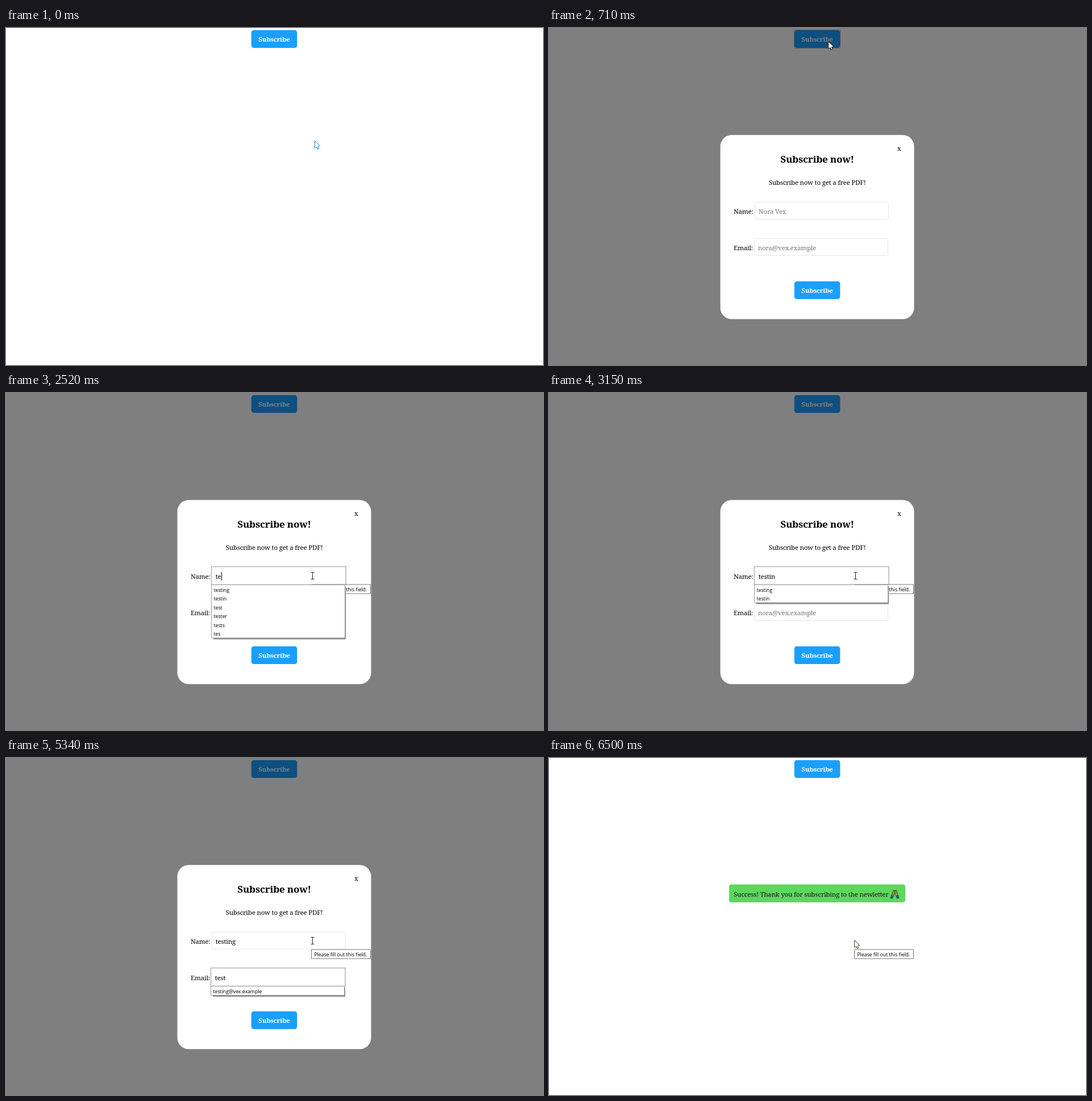
These frames come from a looping animation (945 by 593 pixels, 6.98 s). An HTML page with a canvas:

```html
<!DOCTYPE html>
<html lang="en">
<head>
<meta charset="utf-8">
<title>Subscribe form</title>
<style>
  html, body { margin: 0; width: 100%; height: 100%; overflow: hidden; background: #fff; }
  canvas { display: block; }
</style>
</head>
<body>
<canvas id="stage" width="945" height="593"></canvas>
<script>
const ctx = document.getElementById('stage').getContext('2d');
const LOOP = 6980;
const MID = 472;
const SERIF = '"Noto Serif", serif';
const BODY = `11.5px ${SERIF}`;
const BOLD = `bold 11.4px ${SERIF}`;
const TITLE = `bold 17px ${SERIF}`;
const SMALL = '8.8px "Open Sans", "Noto Sans", sans-serif';
const ROW = 15.5;
const HISTORY = ['testing', 'testin', 'test', 'tester', 'tests', 'tes'];
const EMAIL = 'testing@vex.example';

const during = (t, start, end) => t >= start && t < end;

// Letters appear one by one from start
const typed = (t, word, start, step) =>
  word.slice(0, Math.max(0, Math.floor((t - start) / step) + 1));

const nameAt = t => t < 4020 ? typed(t, 'testin', 2290, 138) : 'testing';
const emailAt = t => t < 5790 ? typed(t, 'test', 4630, 155) : EMAIL;
const caretAt = t => !(during(t, 2120, 2290) || during(t, 3150, 3700) || during(t, 5340, 5790));

function text(str, x, y, font = BODY, color = '#000', align = 'left') {
  ctx.font = font;
  ctx.letterSpacing = font === SMALL ? '-0.05px' : '-0.2px';
  ctx.textAlign = align;
  ctx.fillStyle = color;
  ctx.fillText(str, x, y);
}

function rect(x, y, w, h, color) {
  ctx.fillStyle = color;
  ctx.fillRect(x, y, w, h);
}

function box(x, y, w, h, radius, fill, stroke, line = 1) {
  ctx.beginPath();
  ctx.roundRect(x, y, w, h, radius);
  ctx.fillStyle = fill;
  ctx.fill();
  if (!stroke) return;
  ctx.strokeStyle = stroke;
  ctx.lineWidth = line;
  ctx.stroke();
}

function line(x1, y1, x2, y2, color, width = 1) {
  ctx.beginPath();
  ctx.moveTo(x1, y1);
  ctx.lineTo(x2, y2);
  ctx.strokeStyle = color;
  ctx.lineWidth = width;
  ctx.stroke();
}

function button(y, focused) {
  box(MID - 40.3, y - 0.3, 80.6, 31.4, 4.5, '#1a9fff');
  text('Subscribe', MID, y + 20, BOLD, '#fff', 'center');
  if (!focused) return;
  ctx.setLineDash([1, 1]);
  box(MID - 40.5, y - 0.5, 81, 32, 0, 'transparent', '#777');
  ctx.setLineDash([]);
}

function field(label, x, y, value, hint, focused, caret) {
  text(label, 325, y + 20.5);
  if (focused) box(x - 0.5, y - 0.5, 236.5, 32, 0, '#fff', '#b2b2b8', 1.5);
  else box(x + 0.5, y + 0.5, 235, 30, 3, '#fff', '#e4e6ea');
  text(value || hint, x + 6.7, y + 20.5, BODY, value ? '#000' : '#757575');
  if (!focused || !caret) return;
  const end = value ? ctx.measureText(value).width : 0;
  rect(Math.round(x + 7 + end), y + 9, 1, 15, '#000');
}

function dropdown(x, y, items, selected) {
  const h = items.length * ROW + 1;
  rect(x + 4, y + 3, 233, h - 0.5, '#8c8c8c');
  box(x + 0.5, y + 0.5, 235, h - 0.5, 0, '#fff', '#999');
  if (selected) rect(x + 1, y + 1, 234, ROW, '#0078d7');
  items.forEach((item, i) =>
    text(item, x + 4.5, y + 12.6 + i * ROW, SMALL, selected && !i ? '#fff' : '#000'));
}

function tooltip() {
  box(537.5, 337, 104, 16, 0, '#fff', '#767676');
  text('Please fill out this field.', 542.3, 349, SMALL);
}

function popup(t) {
  const name = nameAt(t);
  const email = emailAt(t);
  rect(0, 0, 945, 593, 'rgba(0,0,0,.5)');
  box(301.5, 188.3, 341, 324, 20, '#fff');
  text('x', 616.3, 216, BODY, '#000', 'center');
  text('Subscribe now!', MID, 237, TITLE, '#000', 'center');
  text('Subscribe now to get a free PDF!', MID, 275.5, BODY, '#000', 'center');
  field('Name:', 362, 306, name, 'Nora Vex', during(t, 1800, 4250), caretAt(t));
  field('Email:', 361, 370, email, 'nora@vex.example', during(t, 4250, 6180), caretAt(t));
  button(446, t >= 6180);
  if (t >= 2520) tooltip();
  if (during(t, 2367, 4020)) {
    dropdown(361, 337, HISTORY.filter(item => item.startsWith(name)), t >= 3700);
  }
  if (during(t, 4710, 5790)) dropdown(360, 401, [EMAIL], t >= 5570);
}

// Two mirrored palms with blue cuffs
function hands(x, y) {
  for (const side of [-1, 1]) {
    ctx.save();
    ctx.translate(x, y);
    ctx.scale(side, 1);
    line(3, 13, 7, 12, '#171717', 5);
    line(3, 13, 6.5, 12.2, '#1769c4', 3);
    line(0.8, 1, 4, 11, '#252515', 4);
    line(1, 2, 3.8, 10.5, '#b5a85a', 2.2);
    ctx.restore();
  }
}

function success() {
  box(317, 222.5, 310, 31.5, 4, '#5cd85c');
  text('Success! Thank you for subscribing to the newletter', 325, 244, BODY, '#151515');
  hands(608.5, 232);
  tooltip();
}

function arrow(x, y, color) {
  ctx.save();
  ctx.translate(x + 0.5, y + 0.5);
  line(3.5, 9, 6.4, 14.8, color, 3.4);
  ctx.beginPath();
  ctx.lineTo(0, 0);
  ctx.lineTo(0, 12.8);
  ctx.lineTo(9, 9);
  ctx.closePath();
  ctx.fillStyle = '#fff';
  ctx.fill();
  ctx.lineWidth = 1;
  ctx.stroke();
  line(3.3, 8, 6.1, 14, '#fff', 1.5);
  ctx.restore();
}

function hand(x, y) {
  box(x - 3, y + 6, 12, 10, 3, '#fff', '#000');
  box(x, y, 3, 11, 1.5, '#fff', '#000');
  rect(x + 0.5, y + 7, 2, 5, '#fff');
}

function beam(x, y) {
  for (const edge of [-5.5, 6.5]) line(x - 2.5, y + edge, x + 3.5, y + edge, '#222');
  line(x + 0.5, y - 5.5, x + 0.5, y + 6.5, '#222');
}

// Position after evenly spaced pointer updates, eased at both ends
function glide(t, start, end, steps, from, to) {
  const count = Math.floor((t - start) / (end - start) * (steps - 1) + 1e-6) + 1;
  const k = Math.max(0, Math.min(1, count / steps));
  const eased = k * k * (3 - 2 * k);
  return from.map((v, i) => Math.round(v + (to[i] - v) * eased));
}

function pointer(t) {
  if (t < 460) arrow(...glide(t, 80, 460, 6, [543, 198], [491, 24]), '#1a80d0');
  else if (t < 710) hand(491, 24);
  else if (t < 1330) arrow(...glide(t, 787, 1250, 7, [491, 23], [490, 301]), '#101020');
  else if (t < 6500) beam(...glide(t, 1570, 1720, 3, [495, 324], [539, 321]));
  else arrow(537, 320, '#284818');
}

function draw() {
  const t = performance.now() % LOOP;
  rect(0, 0, 945, 593, '#fff');
  button(4, during(t, 630, 1800));
  if (t >= 6500) success();
  else if (t >= 710) popup(t);
  pointer(t);
  requestAnimationFrame(draw);
}
draw();
</script>
</body>
</html>
```
